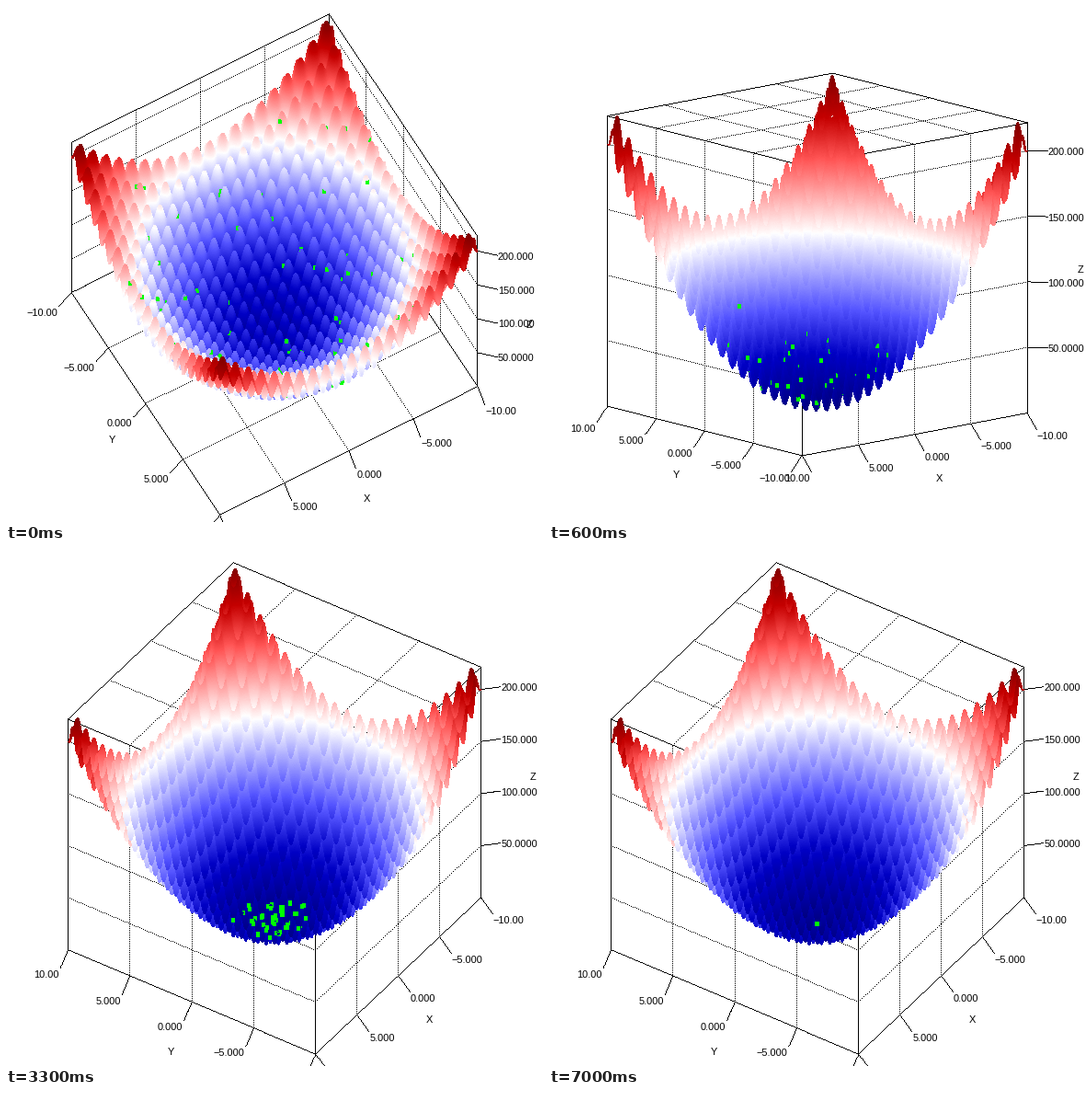
These frames come from a looping animation (584 by 561 pixels, 7.4 s). A matplotlib script:

```python
import numpy as np
import matplotlib.pyplot as plt
from matplotlib.animation import FuncAnimation
from matplotlib.colors import LinearSegmentedColormap

W, H, DPI = 584, 561, 64
FRAMES, INTERVAL = 74, 100
PT = 72 / DPI
CENTER = np.array([291.5, 280.5, 0])
SIZE = 323.5        # edge of the plot cube in pixels
GREEN = (0, 255, 0)

# The camera swings under the bowl during the first steps, then rests.
LAST_TURN = 9
TURN_STEPS = [0, 2, 6, 9]
AZIMUTH = np.polyfit(TURN_STEPS, [30, 8.9, -40.8, -56.3], 3)
ELEVATION = np.polyfit(TURN_STEPS, [59.7, 37.9, -12.7, -39.2], 3)

# Highest cost any member of the swarm may keep at a given step.
CAP_STEPS = [0, 2, 6, 9, 19, 33, 46, 60, 70]
CAPS = [150, 130, 65, 40, 18, 9, 5, 1.5, 0.3]

BOWL = LinearSegmentedColormap.from_list("bowl", [
    (0, (0, 0, 0.5)), (0.14, (0, 0, 0.77)), (0.27, (0.33, 0.33, 1)),
    (0.5, (1, 1, 1)),
    (0.73, (1, 0.33, 0.33)), (0.86, (0.77, 0, 0)), (1, (0.5, 0, 0))])


def rastrigin(x, y):
    return (20 + x * x - 10 * np.cos(2 * np.pi * x)
            + y * y - 10 * np.cos(2 * np.pi * y))


N = 2201
SIDE = np.linspace(-10, 10, N)
HEIGHT = rastrigin(SIDE[:, None], SIDE[None, :])
Z_MAX = HEIGHT.max()
U = SIDE / 20
UZ = HEIGHT / Z_MAX - 0.5
IDS = np.arange(N * N).reshape(N, N)

XY_VALUES = np.array([-10, -5, 0, 5, 10])
Z_VALUES = np.array([50, 100, 150, 200])
XY_TICKS = XY_VALUES / 20
Z_TICKS = Z_VALUES / Z_MAX - 0.5
GRID = [XY_TICKS[1:-1], XY_TICKS[1:-1], Z_TICKS]


def camera(step):
    """Rows give screen x, screen y (down) and nearness."""
    a = np.radians(np.polyval(AZIMUTH, step))
    e = np.radians(np.polyval(ELEVATION, step))
    sa, ca, se, ce = np.sin(a), np.cos(a), np.sin(e), np.cos(e)
    return SIZE * np.array([[-ca, sa, 0],
                            [se * sa, se * ca, -ce],
                            [ce * sa, ce * ca, se]])


def project(m, u):
    return CENTER + m @ u


def draw_line(img, p, q, gap=1):
    count = int(np.abs(q - p)[:2].max()) + 2
    t = np.linspace(0, 1, count)[::gap, None]
    x, y = np.rint(p[:2] + (q - p)[:2] * t).astype(int).T
    ok = (x >= 0) & (x < W) & (y >= 0) & (y < H)
    img[y[ok], x[ok]] = 0


def draw_box(img, m):
    """Three far faces: dotted grid and solid edges."""
    far = -0.5 * np.sign(m[2])
    for face in range(3):
        for j in range(3):
            if j == face:
                continue
            k = 3 - face - j
            lines = [(u, 2) for u in GRID[j]] + [(-0.5, 1), (0.5, 1)]
            for u, gap in lines:
                p = np.zeros(3)
                p[face], p[j], p[k] = far[face], u, -0.5
                q = p.copy()
                q[k] = 0.5
                draw_line(img, project(m, p), project(m, q), gap)


def axis_specs(m):
    """Anchor, outward direction, ticks, values, format, name, label drop."""
    right, down = np.sign(m[0]), np.sign(m[1])
    x_out = np.array([0, down[1], -1])
    y_out = np.array([down[0], 0, -1])
    z_out = np.array([right[0], right[1], 0])
    return [(x_out / 2, x_out, XY_TICKS, XY_VALUES, "%#.4g", "X", 8),
            (y_out / 2, y_out, XY_TICKS, XY_VALUES, "%#.4g", "Y", 8),
            (z_out / 2, z_out, Z_TICKS, Z_VALUES, "%#.6g", "Z", 2)]


def draw_axes(img, m):
    labels = []
    for i, spec in enumerate(axis_specs(m)):
        anchor, out, ticks, values, fmt, name, drop = spec
        for u, value in zip(ticks, values):
            base = anchor.copy()
            base[i] = u
            start, end = project(m, base), project(m, base + 0.048 * out)
            draw_line(img, start, end)
            side = 1 if start[0] >= CENTER[0] else -1
            text = (fmt % value).replace("-", "\u2212")
            labels.append((end[0] + side, end[1] + drop, text,
                           "left" if side > 0 else "right"))
        x, y, _ = project(m, anchor + 0.127 * out)
        labels.append((x, y + 2, name, "center"))
    return labels


def draw_surface(img, m):
    """Paint samples back to front; return the nearness of each pixel."""
    x, y = (np.rint((CENTER[r] + m[r, 0] * U)[:, None] + m[r, 1] * U
                    + m[r, 2] * UZ).astype(int) for r in (0, 1))
    cell = np.clip(y, 0, H - 1) * W + np.clip(x, 0, W - 1)
    sx, sy = np.sign(m[2, :2]).astype(int)
    hit = np.full(H * W, -1)
    hit[cell[::sx, ::sy].ravel()] = IDS[::sx, ::sy].ravel()

    seen = hit >= 0
    ids = hit[seen]
    uz = UZ.ravel()[ids]
    img.reshape(-1, 3)[seen] = BOWL(uz + 0.5, bytes=True)[:, :3]
    depth = np.full(H * W, -np.inf)
    depth[seen] = m[2, 0] * U[ids // N] + m[2, 1] * U[ids % N] + m[2, 2] * uz
    return depth.reshape(H, W)


def build_view(step):
    m = camera(step)
    img = np.full((H, W, 3), 255, np.uint8)
    draw_box(img, m)
    labels = draw_axes(img, m)
    depth = draw_surface(img, m)
    return m, img, depth, labels


def evolve():
    """Differential evolution slowed to follow the falling cost cap."""
    rng = np.random.default_rng(4)
    pos = rng.uniform(-10, 10, (300, 2))
    pos = pos[rastrigin(*pos.T) < CAPS[0]][:80]
    count = len(pos)
    patience = rng.random(count)
    states = [pos]
    for step in range(1, FRAMES):
        cap = np.interp(step, CAP_STEPS, CAPS)
        a, b, c = pos[rng.integers(count, size=(3, count))]
        trial = np.clip(a + 0.6 * (b - c), -10, 10)
        cost = rastrigin(*pos.T)
        better = (rastrigin(*trial.T) < cost) & (cost > patience * cap)
        pos = np.where(better[:, None], trial, pos)
        # Anyone still too high hops to a lower hollow nearer the middle.
        for _ in range(14):
            high = rastrigin(*pos.T) > cap
            pos = np.where(high[:, None], np.trunc(0.8 * pos), pos)
        states.append(pos)
    return states


DOT_Y, DOT_X = (g.ravel() for g in np.mgrid[-2:3, -2:2])
DOT_LIFT = 1.5


def draw_dots(img, m, depth, pos):
    for x, y in pos:
        u = np.array([x / 20, y / 20, rastrigin(x, y) / Z_MAX - 0.5])
        sx, sy, near = project(m, u)
        px = np.clip(round(sx) + DOT_X, 0, W - 1)
        py = np.clip(round(sy) + DOT_Y, 0, H - 1)
        ok = near + DOT_LIFT >= depth[py, px]
        img[py[ok], px[ok]] = GREEN


views = [build_view(s) for s in range(LAST_TURN + 1)]
swarm = evolve()

fig = plt.figure(figsize=(W / DPI, H / DPI), dpi=DPI, facecolor="white")
ax = fig.add_axes([0, 0, 1, 1])
ax.axis("off")
picture = ax.imshow(views[0][1], extent=(0, W, H, 0), aspect="auto",
                    interpolation="nearest")
ax.set_xlim(0, W)
ax.set_ylim(H, 0)
texts = [ax.text(0, 0, "", family="Liberation Sans", fontsize=11 * PT,
                 color="black", va="center", clip_on=True)
         for _ in views[0][3]]


def update(frame):
    m, img, depth, labels = views[min(frame, LAST_TURN)]
    img = img.copy()
    draw_dots(img, m, depth, swarm[frame])
    picture.set_data(img)
    for artist, (x, y, text, align) in zip(texts, labels):
        artist.set_position((x, y))
        artist.set_text(text)
        artist.set_ha(align)
    return [picture, *texts]


anim = FuncAnimation(fig, update, frames=FRAMES, interval=INTERVAL,
                     repeat=True, repeat_delay=0)
plt.show()
```
